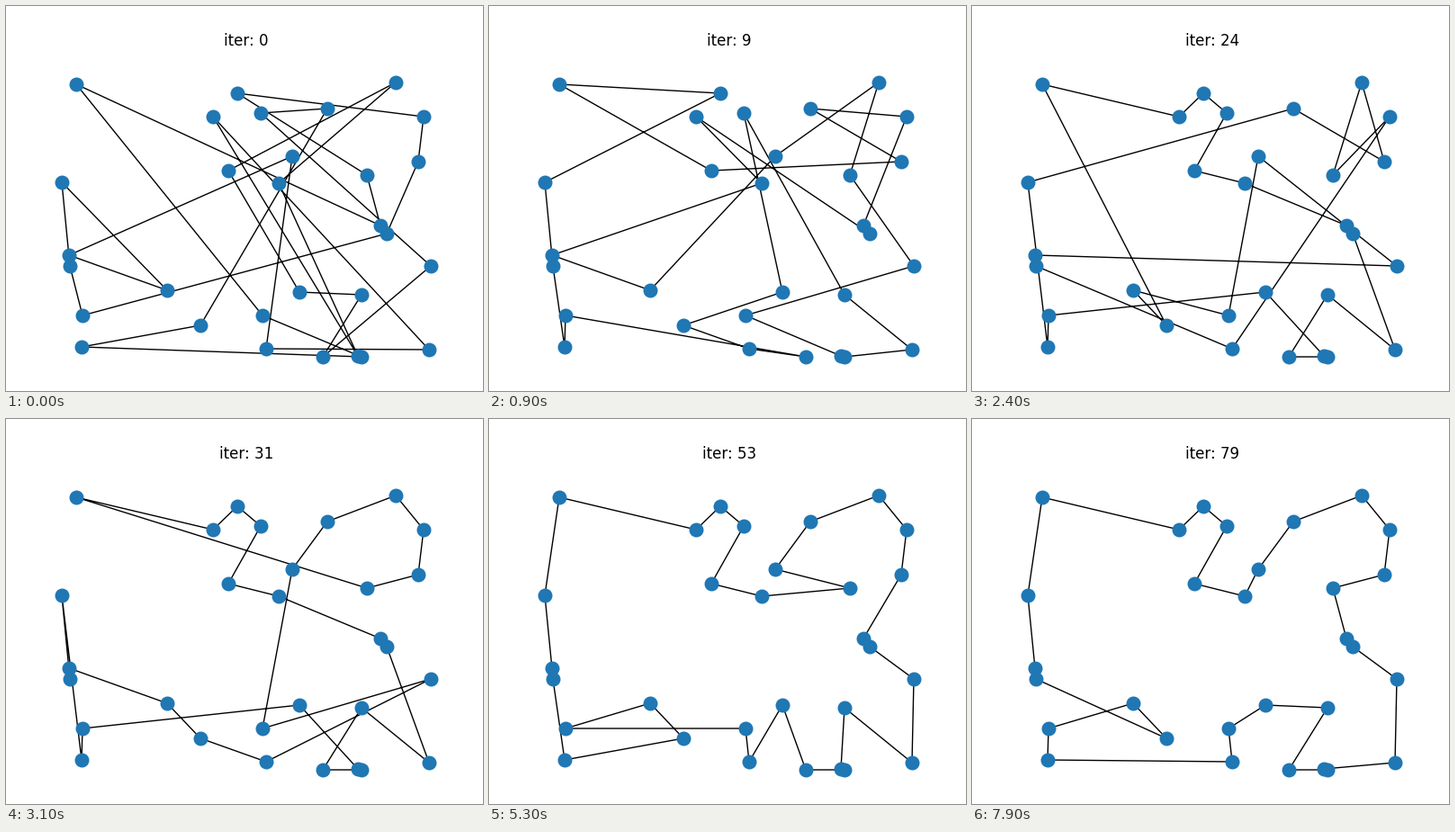
A matplotlib script for the animation above (8000 ms loop, 530 by 428 pixels).

```python
import matplotlib.pyplot as plt
from matplotlib.animation import FuncAnimation

W, H, DPI = 530, 428, 100
FRAMES, INTERVAL = 80, 100

NAMES = "ABCDEFGHIJKLMNOPQRSTUVWXYZabcd"
POINTS = [
    (78, 87), (257, 97), (230, 123), (283, 119), (357, 114), (433, 85),
    (464, 123), (458, 173), (401, 188), (318, 167), (303, 197), (247, 183),
    (62, 196), (70, 277), (71, 289), (85, 344), (84, 379), (179, 316),
    (216, 355), (285, 344), (289, 381), (326, 318), (395, 321), (352, 390),
    (391, 389), (395, 390), (470, 382), (472, 289), (423, 253), (416, 244),
]
CITY = dict(zip(NAMES, POINTS))

# Early search: whole tours, linked by segment reversals
STAGES = [
    (0, "AdIBGHcPOMRNJUaCYKFLVWXbDESQZT"),
    (9, "ABMOQPXUSVDWaZYTbIFJRNKCcdGEHL"),
    (16, "AKdGIFHLNOMCBEDXWaZYTJbcUVRSPQ"),
    (31, "ACBDLKdcaWXZYVPQMONRSUbTJEFGHI"),
]

# Late search: iteration -> (city, run of cities moved right after it)
MOVES = {
    38: ("H", "b"), 40: ("I", "M"), 42: ("c", "bHGFEJI"), 44: ("I", "d"),
    48: ("V", "UTPRSQON"), 50: ("K", "IJEFGHbcd"), 52: ("H", "dcb"),
    53: ("W", "YZX"), 57: ("T", "Q"), 62: ("b", "W"), 65: ("V", "T"),
    68: ("H", "I"), 75: ("X", "W"),
}


def reversals(tour, goal):
    """All tours met while sorting tour into goal by reversing segments."""
    path = [tour]
    for k, city in enumerate(goal):
        j = tour.index(city)
        if j != k:
            tour = tour[:k] + tour[k:j + 1][::-1] + tour[j + 1:]
            path.append(tour)
    return path


def relocate(tour, after, run):
    rest = "".join(c for c in tour if c not in run)
    return rest.replace(after, after + run)


def build_tours():
    tours = []
    for (start, tour), (end, goal) in zip(STAGES, STAGES[1:]):
        path = reversals(tour, goal)
        last, span = len(path) - 1, end - start
        tours += [path[round(last * i / span)] for i in range(span)]
    tour = STAGES[-1][1]
    for i in range(len(tours), FRAMES):
        if i in MOVES:
            tour = relocate(tour, *MOVES[i])
        tours.append(tour)
    return tours


tours = build_tours()

fig = plt.figure(figsize=(W / DPI, H / DPI), dpi=DPI, facecolor="white")
ax = fig.add_axes([0, 0, 1, 1])
ax.set_xlim(0, W)
ax.set_ylim(H, 0)
ax.axis("off")

route, = ax.plot([], [], color="black", lw=1, zorder=1)
ax.scatter(*zip(*POINTS), s=100, color="#1f77b4", linewidths=1.5, zorder=2)
title = ax.text(267, 44, "", ha="center", va="baseline",
                fontsize=12, family="DejaVu Sans")


def draw(i):
    tour = tours[i]
    route.set_data(*zip(*(CITY[c] for c in tour + tour[0])))
    title.set_text(f"iter: {i}")
    return route, title


anim = FuncAnimation(fig, draw, frames=FRAMES, interval=INTERVAL,
                     repeat=True, repeat_delay=0)
plt.show()
```
